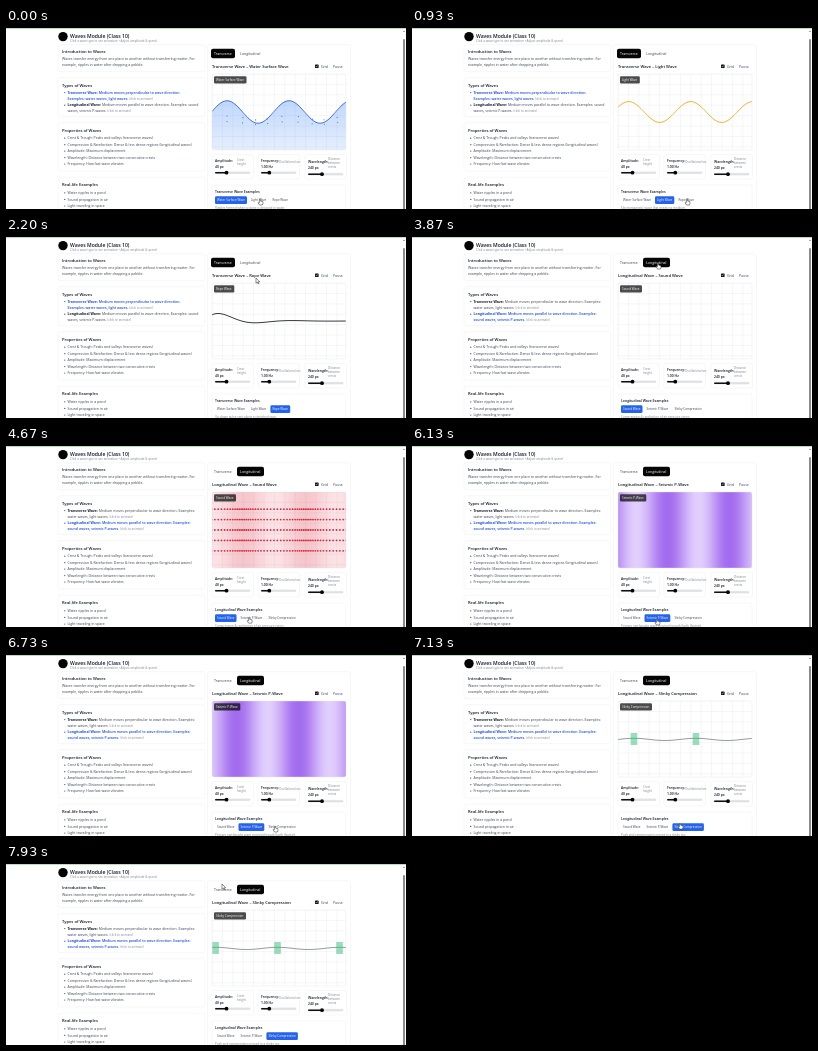
These frames come from a looping animation (400 px wide and 181 px high, 8 s). An HTML page with a canvas:

```html
<!DOCTYPE html>
<html lang="en">
<head>
<meta charset="utf-8">
<title>Waves Module</title>
<style>
  html, body { margin: 0; width: 100%; height: 100%; overflow: hidden; background: #fff; }
  canvas, svg { position: absolute; left: 0; top: 0; width: 400px; height: 181px; }
  text { font-family: "Open Sans", "Noto Sans", sans-serif; }
</style>
</head>
<body>
<canvas id="stage"></canvas>
<svg id="layer" viewBox="0 0 400 181">
  <g id="page"></g>
  <g id="state"></g>
  <g id="pointer">
    <path id="arrow" d="M0 0V5.2L1.3 4.1L2.2 6L3 5.6L2.1 3.8H3.7Z" fill="#fff" stroke="#222" stroke-width=".5"/>
    <path id="hand" d="M-.6 .4Q0 -.5 .6 .4V2.1L2.9 2.7Q3.3 4.8 2.4 6H-.5L-2 3.7Q-1.6 2.9 -.6 3.7Z" fill="#fff" stroke="#222" stroke-width=".5"/>
  </g>
</svg>
<script>
const LOOP = 8000;
const BOX = { x: 206, y: 46, w: 134, h: 76 };
const MID = 84, AMP = 10.4, LEN = 62, CELL = 10.4;
const INK = '#111827', BODY = '#374151', MUTED = '#7d8592', BLUE = '#1d4ed8';
const $ = id => document.getElementById(id);

const canvas = $('stage'), c = canvas.getContext('2d');
const dpr = window.devicePixelRatio || 1;
canvas.width = 400 * dpr;
canvas.height = 181 * dpr;
c.scale(dpr, dpr);

// ---------- text ----------
const text = (x, y, s, size = 3.5, fill = BODY, weight = 400) =>
  `<text x="${x}" y="${y}" font-size="${size}" fill="${fill}" font-weight="${weight}">${s}</text>`;
const heading = (y, s) => text(56, y, s, 4.1, INK, 600);
const lines = (x, y, step, list, ...style) =>
  list.map((s, i) => text(x, y + i * step, s, ...style)).join('');

const PROPERTIES = [
  'Crest &amp; Trough: Peaks and valleys (transverse waves)',
  'Compression &amp; Rarefaction: Dense &amp; less dense regions (longitudinal waves)',
  'Amplitude: Maximum displacement',
  'Wavelength: Distance between two consecutive crests',
  'Frequency: How fast wave vibrates'
];
const EXAMPLES = ['Water ripples in a pond', 'Sound propagation in air', 'Light traveling in space'];

const SLIDERS = [
  { x: 209, y: 144.7, knob: 220.5, name: 'Amplitude:', value: '40 px', note: ['Crest', 'height'], nx: 231, ny: 133.4 },
  { x: 255, y: 144.7, knob: 263.3, name: 'Frequency:', value: '1.00 Hz', note: ['Oscillations/sec'], nx: 273, ny: 135.4 },
  { x: 302, y: 146.2, knob: 316, name: 'Wavelength:', value: '240 px', note: ['Distance', 'between', 'crests'], nx: 322, ny: 132.4 }
];

$('page').innerHTML =
  text(64, 10.1, 'Waves Module (Class 10)', 5.05, INK, 600) +
  text(64, 14, 'Click a wave type to see animation • Adjust amplitude &amp; speed', 3, MUTED) +
  heading(25.4, 'Introduction to Waves') +
  lines(56, 31.7, 6, [
    'Waves transfer energy from one place to another without transferring matter. For',
    'example, ripples in water after dropping a pebble.'
  ]) +
  heading(58.5, 'Types of Waves') +
  heading(103.5, 'Properties of Waves') +
  lines(61.5, 111.4, 6.45, PROPERTIES) +
  heading(158, 'Real-life Examples') +
  lines(61.5, 166, 6.6, EXAMPLES) +
  text(315, 39.6, 'Grid') +
  text(327, 39.6, 'Pause', 3.5, '#3b4478') +
  SLIDERS.map(s =>
    text(s.x, s.y - 10.9, s.name, 3.4, INK, 600) +
    text(s.x, s.y - 5.1, s.value, 3.4, INK, 600) +
    lines(s.nx, s.ny, 4, s.note, 3, MUTED)).join('');

// ---------- scenes ----------
const MODES = [
  { name: 'Transverse', tab: [205, 24], items: [
    ['Water Surface Wave', 209, 32, 'Ripples formed when a stone is dropped in water.'],
    ['Light Wave', 243, 19.3, 'Electromagnetic wave that needs no medium.'],
    ['Rope Wave', 264.4, 19.8, 'Up-down pulse sent along a stretched rope.']] },
  { name: 'Longitudinal', tab: [231, 27], items: [
    ['Sound Wave', 209, 21.5, 'Compression &amp; rarefaction of air pressure zones.'],
    ['Seismic P-Wave', 232.5, 25.8, 'Primary earthquake wave moving through Earth (fastest).'],
    ['Slinky Compression', 260.4, 31.5, 'Push and compressions moved in a slinky toy.']] }
];
// start time, mode, item, drawing
const SCENES = [
  [0, 0, 0, water], [420, 0, 1, light], [1130, 0, 2, rope],
  [3800, 1, 0, () => {}], [3930, 1, 0, sound], [5130, 1, 1, seismic], [6950, 1, 2, slinky]
];

const TYPES = [
  ['Transverse Wave:', [
    ['Medium moves perpendicular to wave direction.', 'Examples: water waves, light waves.'],
    ['Medium moves perpendicular to wave direction. Examples:', 'water waves, light waves.']]],
  ['Longitudinal Wave:', [
    ['Medium moves parallel to wave direction. Examples:', 'sound waves, seismic P-waves.'],
    ['Medium moves parallel to wave direction. Examples: sound', 'waves, seismic P-waves.']]]
];

function typeText(i, mode) {
  const on = i === mode, [name, wraps] = TYPES[i];
  const [first, second] = wraps[on ? 0 : 1];
  const style = [3.5, on ? BLUE : BODY, on ? 600 : 400];
  const y = 65.8 + i * 12.6;
  const hint = `<tspan font-size="3" font-weight="400" fill="${MUTED}">(click to animate)</tspan>`;
  return text(61.5, y, `<tspan font-weight="700" fill="${on ? BLUE : INK}">${name}</tspan> ${first}`, ...style) +
    text(61.5, y + 6, `${second} ${hint}`, ...style);
}

function stateText(mode, item) {
  const m = MODES[mode];
  const [label, , , about] = m.items[item];
  return typeText(0, mode) + typeText(1, mode) +
    MODES.map((o, i) => text(o.tab[0] + 3.1, 26.8, o.name, 3.5, i === mode ? '#fff' : BODY)).join('') +
    text(206, 39.8, `${m.name} Wave – ${label}`, 4.08, INK, 600) +
    text(210, 53.1, label, 3, '#fff') +
    text(209, 165, `${m.name} Wave Examples`, 3.45, INK, 600) +
    m.items.map(([s, x], i) => text(x + 2, 173.4, s, 3, i === item ? '#fff' : BODY)).join('') +
    text(209, 181.1, about, 3.05, MUTED);
}

// ---------- shapes ----------
function box(x, y, w, h, r, fill, line) {
  c.beginPath();
  c.roundRect(x, y, w, h, r);
  if (fill) { c.fillStyle = fill; c.fill(); }
  if (line) { c.strokeStyle = line; c.lineWidth = 0.4; c.stroke(); }
}
function dot(x, y, r, fill) {
  c.beginPath();
  c.arc(x, y, r, 0, 7);
  c.fillStyle = fill;
  c.fill();
}
function drawPage() {
  c.fillStyle = '#fff';
  c.fillRect(0, 0, 400, 181);
  c.fillStyle = '#a9d3ac';
  c.fillRect(0, 0, 400, 0.8);
  // scrollbar
  box(397, 11, 2, 175, 1, '#8b8b8b');
  c.beginPath();
  c.moveTo(396.8, 4); c.lineTo(398, 2.4); c.lineTo(399.2, 4);
  c.fill();
  const edge = '#e8eaee';
  [[16.7, 27], [49.7, 39], [94.7, 48.3], [149.2, 45]].forEach(([y, h]) => box(52, y, 147, h, 2.5, null, edge));
  box(201.5, 16.7, 143, 190, 2.5, null, edge);
  [206, 252, 299].forEach(x => box(x, 126.5, 41.5, 24.5, 2, null, edge));
  box(206, 157, 134, 40, 2, null, edge);
  dot(57, 8.6, 4.7, '#050505');
  for (let i = 0; i < 5; i++) dot(58.8, 110.2 + i * 6.45, 0.6, BODY);
  for (let i = 0; i < 3; i++) dot(58.8, 164.8 + i * 6.6, 0.6, BODY);
  box(309, 36.5, 3.6, 3.6, 0.7, '#111');
  c.beginPath();
  c.moveTo(309.8, 38.3); c.lineTo(310.5, 39.1); c.lineTo(311.8, 37.4);
  c.strokeStyle = '#fff'; c.lineWidth = 0.5; c.stroke();
  SLIDERS.forEach(s => {
    box(s.x, s.y - 0.8, 35, 1.6, 0.8, '#e3e5e8', '#c9cdd2');
    box(s.x, s.y - 0.8, s.knob - s.x, 1.6, 0.8, '#111');
    dot(s.knob, s.y, 1.9, '#050505');
  });
}
function drawState(mode, item) {
  const m = MODES[mode];
  box(m.tab[0], 20.8, m.tab[1], 9.4, 2, '#050505');
  const [, x, w] = m.items[item];
  box(x, 168.3, w, 7.8, 1.4, '#2563eb');
  [0, 1].forEach(i => dot(58.8, 64.6 + i * 12.6, 0.6, i === mode ? BLUE : BODY));
}
function grid() {
  c.beginPath();
  for (let x = BOX.x; x <= BOX.x + BOX.w; x += CELL) { c.moveTo(x, BOX.y); c.lineTo(x, BOX.y + BOX.h); }
  for (let y = BOX.y; y <= BOX.y + BOX.h; y += CELL) { c.moveTo(BOX.x, y); c.lineTo(BOX.x + BOX.w, y); }
  c.strokeStyle = 'rgba(110,120,140,.17)';
  c.lineWidth = 0.4;
  c.stroke();
}

// ---------- waves ----------
// phase of a 1 Hz wave with a crest at x0 when the clock shows t0
const phase = (x, t, x0, t0, len = LEN) => 2 * Math.PI * ((x - x0) / len - (t - t0) / 1000);

function curve(fn, color, width) {
  c.beginPath();
  for (let x = BOX.x; x <= BOX.x + BOX.w; x++) c.lineTo(x, fn(x));
  c.strokeStyle = color;
  c.lineWidth = width;
  c.stroke();
}
function water(t) {
  const ph = x => phase(x, t, 221, 0);
  const y = x => MID - AMP * 1.08 * Math.cos(ph(x));
  const bottom = BOX.y + BOX.h;
  curve(y, '#2f62c9', 0.9);
  c.lineTo(BOX.x + BOX.w, bottom);
  c.lineTo(BOX.x, bottom);
  const g = c.createLinearGradient(0, 72, 0, bottom);
  g.addColorStop(0, 'rgba(59,130,246,.32)');
  g.addColorStop(1, 'rgba(59,130,246,.13)');
  c.fillStyle = g;
  c.fill();
  for (let x = 207; x < 340; x += 14)
    for (let row = 0; row < 2; row++) {
      const r = 2 - row * 0.6;
      dot(x + r * Math.sin(ph(x)), 90 + row * 5 - r * Math.cos(ph(x)), 0.6, '#3f74d8');
    }
}
function light(t) {
  curve(x => MID - AMP * Math.cos(phase(x, t, 221, 0)), '#f0ad1e', 0.9);
}
function rope(t) {
  curve(x => MID - AMP * Math.exp((BOX.x - x) / 26) * Math.cos(phase(x, t, 217, 2200, 74)), '#20242c', 0.9);
}
function bands(t, x0, t0, low, high) {
  for (let x = BOX.x; x < BOX.x + BOX.w; x++) {
    const d = 0.5 + 0.5 * Math.cos(phase(x, t, x0, t0));
    c.fillStyle = `rgb(${low.map((v, i) => Math.round(v + (high[i] - v) * d))})`;
    c.fillRect(x, BOX.y, 1, BOX.h);
  }
}
function sound(t) {
  bands(t, 237, 4670, [252, 226, 229], [246, 198, 204]);
  grid();
  for (let x = 203; x < 344; x += CELL / 4) {
    const px = x - 3 * Math.sin(phase(x, t, 237, 4670));
    for (let row = -2; row <= 2; row++) dot(px, MID + row * CELL, 0.9, '#d5293f');
  }
}
function seismic(t) {
  bands(t, 222, 5600, [225, 206, 253], [163, 108, 238]);
}
function slinky(t) {
  curve(x => MID + 0.4 + 1.1 * Math.sin(phase(x, t, 225, 7930)), '#7b8580', 0.8);
  const shift = ((271.5 + (t - 7930) / 1000 * LEN - BOX.x) % LEN + LEN) % LEN;
  for (let x = BOX.x + shift - LEN; x < 350; x += LEN) {
    c.fillStyle = 'rgba(52,190,120,.5)';
    c.fillRect(x - 3.3, 78, 6.6, 12);
  }
}

// ---------- pointer ----------
const PATH = [
  [0, 254, 171], [450, 254, 171], [850, 275, 171], [1350, 275, 171], [1800, 272, 130],
  [2200, 250, 41], [2600, 246, 26], [3930, 246, 26], [4100, 246, 40], [4550, 243, 171],
  [5200, 245, 173], [6150, 245, 173], [6600, 269, 171], [7080, 269, 171], [7500, 246, 100],
  [7930, 216, 20], [8000, 215, 22]
];
function movePointer(t) {
  const i = PATH.findIndex(p => p[0] > t);
  const [t0, x0, y0] = PATH[i - 1], [t1, x1, y1] = PATH[i];
  const u = (t - t0) / (t1 - t0), e = u * u * (3 - 2 * u);
  const x = x0 + (x1 - x0) * e, y = y0 + (y1 - y0) * e;
  $('pointer').setAttribute('transform', `translate(${x} ${y})`);
  const over = y > 168 || (y > 22 && y < 30);
  $('hand').style.display = over ? '' : 'none';
  $('arrow').style.display = over ? 'none' : '';
}

// ---------- loop ----------
let shown = null;
function draw(now) {
  const t = now % LOOP;
  const scene = SCENES.filter(s => s[0] <= t).pop();
  const [, mode, item, wave] = scene;
  if (scene !== shown) {
    $('state').innerHTML = stateText(mode, item);
    shown = scene;
  }
  drawPage();
  drawState(mode, item);
  c.save();
  c.beginPath();
  c.roundRect(BOX.x, BOX.y, BOX.w, BOX.h, 2);
  c.clip();
  if (wave !== sound) grid();
  wave(t);
  c.restore();
  box(BOX.x, BOX.y, BOX.w, BOX.h, 2, null, '#dfe3e8');
  const [, , w] = MODES[mode].items[item];
  box(208, 48.3, w + 0.5, 7.2, 1.2, 'rgba(0,0,0,.7)');
  movePointer(t);
}
const start = performance.now();
function frame() {
  draw(performance.now() - start);
  requestAnimationFrame(frame);
}
frame();
</script>
</body>
</html>
```
